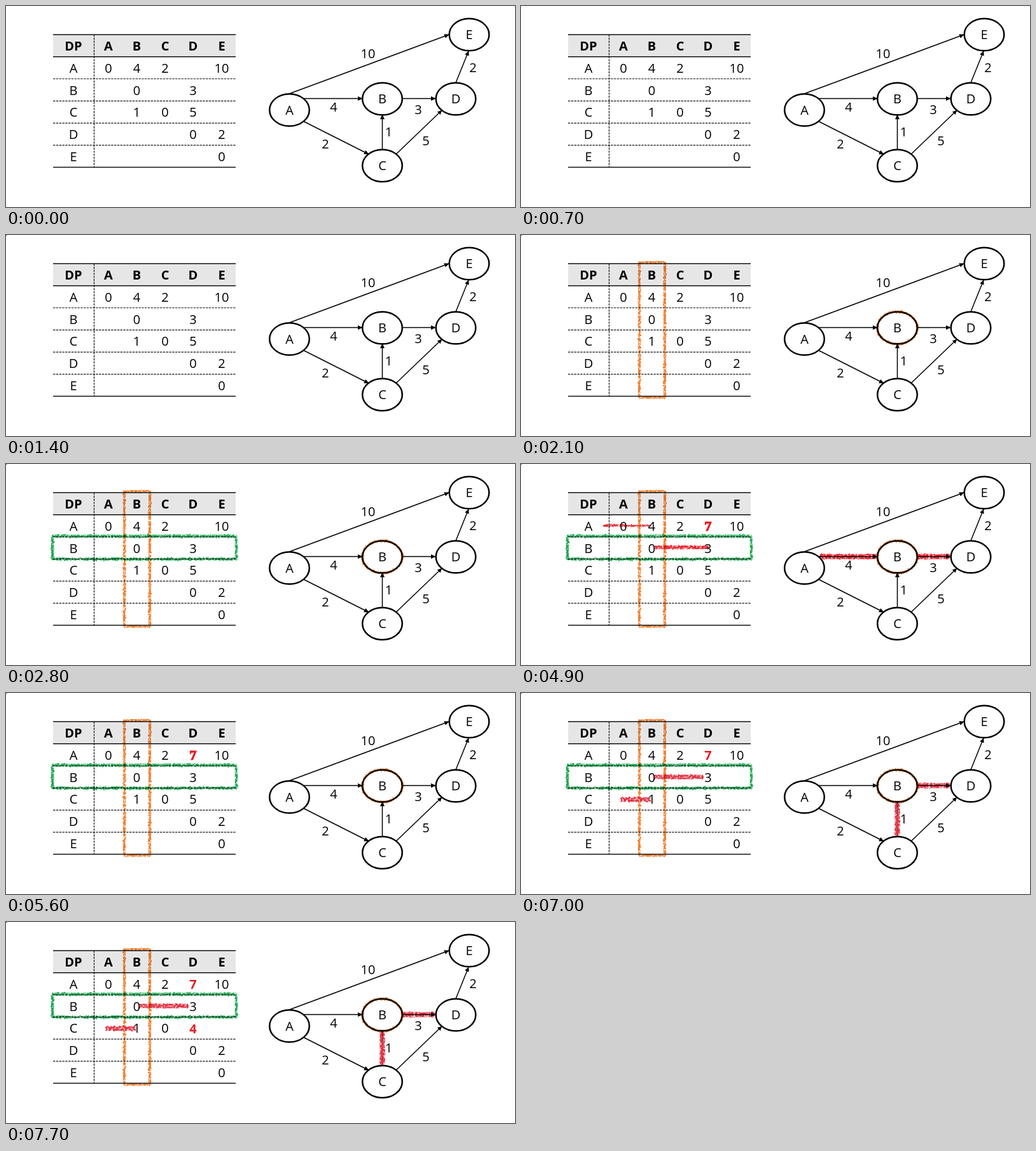
An HTML page that plays this animation: 800x316 px, repeating every 8 s.

```html
<!DOCTYPE html>
<html lang="en">
<head>
<meta charset="utf-8">
<title>Shortest paths table</title>
<style>
html, body { margin: 0; width: 100%; height: 100%; overflow: hidden; background: #fff; }
svg { display: block; width: 800px; height: 316px; }
text { font: 20px "Open Sans", "Noto Sans", sans-serif; text-anchor: middle; }
.bold { font-weight: 700; }
.new { font-weight: 700; fill: #ea1c24; }
.heavy { font: 700 20px "Noto Serif", serif; stroke: #ea1c24; stroke-width: 1; }
.rule { stroke: #111; stroke-width: 1.5; }
.dash { stroke: #111; stroke-width: 1.2; stroke-dasharray: 3.4 1.4; }
.edge { stroke: #000; stroke-width: 1.5; }
.node { fill: #fff; stroke: #000; stroke-width: 2.5; }
.crayon { fill: none; filter: url(#crayon); mix-blend-mode: multiply; }
.red { stroke: #e8202c; }
.rose { stroke: #e43344; }
.orange { stroke: #f08030; }
.green { stroke: #1da650; }

/* One step is 700 ms, or 8.75% of the loop. */
.step { animation: 8s step-end infinite; }
#dot { animation-name: dot; }
#column { animation-name: column; }
#row { animation-name: row; }
#pathAB { animation-name: pathAB; }
#pathABD { animation-name: pathABD; }
#seven { animation-name: seven; }
#pathCB { animation-name: pathCB; }
#pathCBD { animation-name: pathCBD; }
#four { animation-name: four; }
#five { animation-name: five; }
@keyframes dot { 0% { opacity: 0 } 17.5%, 100% { opacity: 1 } }
@keyframes column { 0% { opacity: 0 } 26.25%, 100% { opacity: 1 } }
@keyframes row { 0% { opacity: 0 } 35%, 100% { opacity: 1 } }
@keyframes pathAB { 0% { opacity: 0 } 43.75% { opacity: 1 } 70%, 100% { opacity: 0 } }
@keyframes pathABD { 0% { opacity: 0 } 52.5% { opacity: 1 } 70%, 100% { opacity: 0 } }
@keyframes seven { 0% { opacity: 0 } 61.25% { opacity: 1 } 78.75%, 100% { opacity: 0 } }
@keyframes pathCB { 0% { opacity: 0 } 78.75%, 100% { opacity: 1 } }
@keyframes pathCBD { 0% { opacity: 0 } 87.5%, 100% { opacity: 1 } }
@keyframes four { 0% { opacity: 0 } 96.25%, 100% { opacity: 1 } }
@keyframes five { 0% { opacity: 1 } 96.25%, 100% { opacity: 0 } }
</style>
</head>
<body>
<svg viewBox="0 0 800 316">
  <defs>
    <filter id="crayon" filterUnits="userSpaceOnUse" x="0" y="0" width="800" height="316" color-interpolation-filters="sRGB">
      <feTurbulence type="fractalNoise" baseFrequency=".32" numOctaves="2" seed="4" result="noise"/>
      <feDisplacementMap in="SourceGraphic" in2="noise" scale="4" xChannelSelector="R" yChannelSelector="G" result="rough"/>
      <feColorMatrix in="noise" values="0 0 0 0 0  0 0 0 0 0  0 0 0 0 0  0 0 0 3.5 -.8" result="grain"/>
      <feComposite in="rough" in2="grain" operator="in"/>
    </filter>
    <marker id="tip" markerUnits="userSpaceOnUse" markerWidth="8" markerHeight="8" refX="7" refY="4" orient="auto">
      <path d="M0 .5 7.5 4 0 7.5z"/>
    </marker>
  </defs>

  <g id="table">
    <path fill="#e7e6e6" d="M74 45h287v35H74z"/>
    <path class="rule" d="M74 45h287M74 79.8h287M74 253.6h287"/>
    <path class="dash" d="M74 114.5h287M74 149.4h287M74 184.2h287M74 218.9h287M138.5 45v209"/>
  </g>
  <g id="graph"></g>

  <path id="dot" class="step" d="M0 0h1v1H0z"/>

  <g id="column" class="step crayon orange" stroke-width="4">
    <rect x="186" y="43" width="40" height="212.5" rx="2"/>
    <ellipse cx="591.5" cy="146" rx="31.5" ry="25.5"/>
  </g>
  <g id="row" class="step crayon green" stroke-width="4.5">
    <rect x="73" y="113.5" width="289" height="36" rx="2"/>
  </g>

  <g id="pathAB" class="step crayon red">
    <path stroke-width="3.5" d="M130 97H205"/>
    <path stroke-width="8" d="M470 145.5H558"/>
  </g>
  <g id="pathABD" class="step crayon red">
    <path stroke-width="5.5" d="M210 131H295"/>
    <path stroke-width="8" d="M624 145.5H674"/>
  </g>
  <text id="seven" class="step new heavy" x="294" y="104.5">7</text>

  <g id="pathCB" class="step">
    <text class="new" x="294" y="104.5">7</text>
    <g class="crayon rose">
      <path stroke-width="7" d="M157 167.5H204"/>
      <path stroke-width="8" d="M591.5 173V224"/>
    </g>
  </g>
  <g id="pathCBD" class="step crayon rose">
    <path stroke-width="7" d="M208 132H287"/>
    <path stroke-width="8" d="M624 145.5H674"/>
  </g>
  <text id="four" class="step new" x="294" y="174.5">4</text>
</svg>
<script>
const table = document.getElementById("table");
const graph = document.getElementById("graph");

function add(parent, tag, attrs, text = "") {
  const el = document.createElementNS(parent.namespaceURI, tag);
  for (const key in attrs) el.setAttribute(key, attrs[key]);
  el.textContent = text;
  return parent.appendChild(el);
}

// Text centred on a point
const label = (parent, text, x, y, attrs) => add(parent, "text", { x, y: y + 7.2, ...attrs }, text);

const columns = [106, 161, 205.5, 250, 294, 339];
const rows = ["DP A B C D E", "A 0 4 2 - 10", "B - 0 - 3 -", "C - 1 0 5 -", "D - - - 0 2", "E - - - - 0"];
rows.forEach((row, r) => row.split(" ").forEach((cell, c) => {
  if (cell === "-") return;
  const attrs = r ? {} : { class: "bold" };
  if (cell === "5") Object.assign(attrs, { id: "five", class: "step" });
  label(table, cell, columns[c], 62.8 + r * 34.8, attrs);
}));

const nodes = { A: [445.5, 163.5], B: [591.5, 146], C: [591.5, 251], D: [707, 146], E: [728, 45] };
for (const name in nodes) {
  const [cx, cy] = nodes[name];
  add(graph, "ellipse", { class: "node", cx, cy, rx: 31.3, ry: 25.3 });
  label(graph, name, cx, cy);
}

// Path, weight, weight position
const edges = [
  ["M445 138 696 45", 10, 569, 75],
  ["M467 145.5H560", 4, 515, 159],
  ["M623 145.5H675", 3, 648, 163],
  ["M591.5 225V171", 1, 601.5, 198],
  ["M468 181.5 570 233", 2, 502, 217],
  ["M613 233 685 164", 5, 660, 212],
  ["M707 120.5 727 71", 2, 734, 97],
];
for (const [d, weight, x, y] of edges) {
  add(graph, "path", { class: "edge", d, "marker-end": "url(#tip)" });
  label(graph, weight, x, y);
}
</script>
</body>
</html>
```
